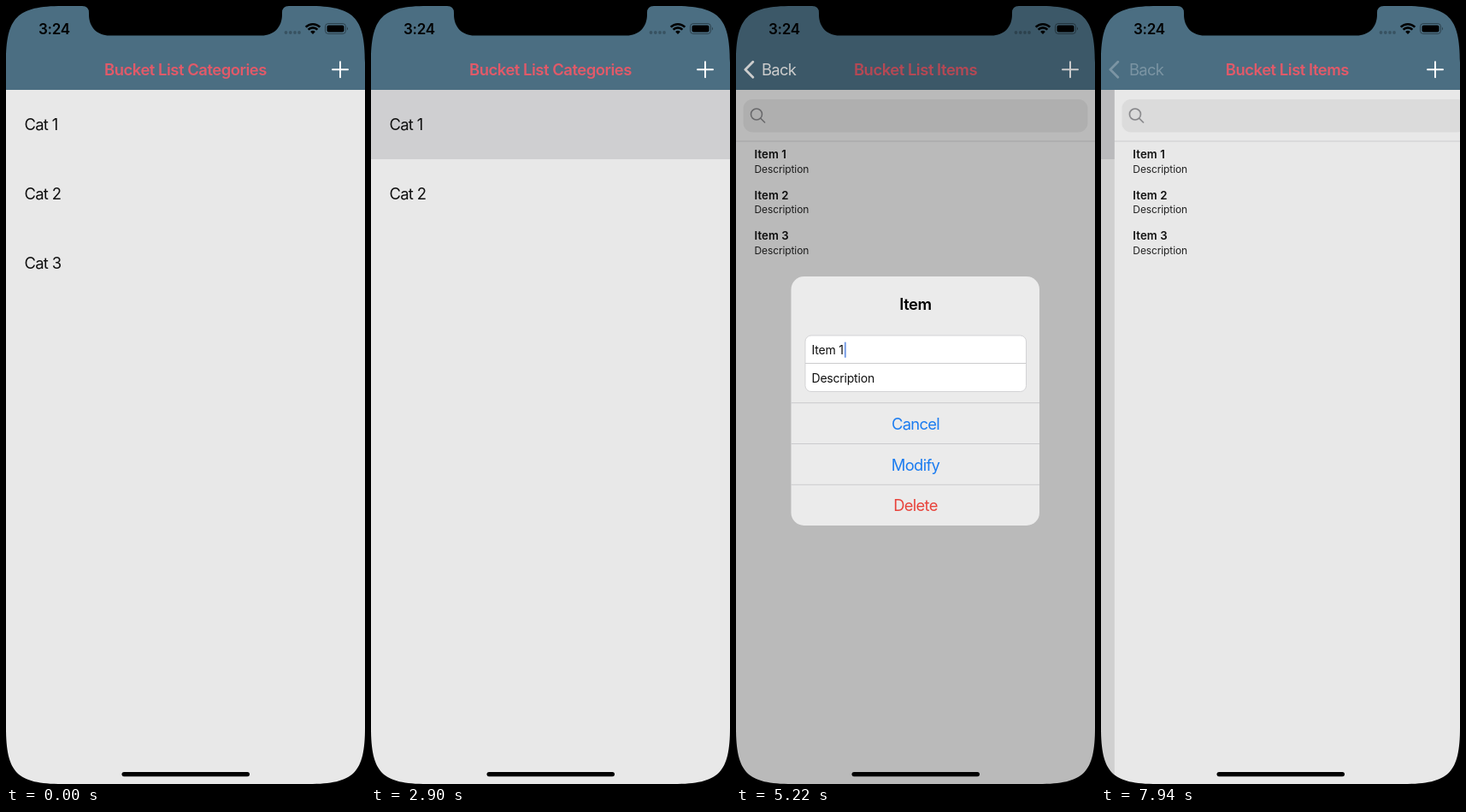
Recreate the animation shown at these times as an HTML page. Size 420 by 909 pixels, loop 8 s.

```html
<!DOCTYPE html>
<html lang="en">
<head>
<meta charset="utf-8">
<title>Bucket list app</title>
<style>
html, body { margin: 0; width: 100%; height: 100%; overflow: hidden; background: #000; }
svg { display: block; width: 420px; height: 909px; }

:root { --nav: cubic-bezier(.36, .66, .04, 1); }
text { font: 400 18.4px Inter, "Liberation Sans", sans-serif; letter-spacing: -.7px; fill: #101010; }
.title { font-weight: 600; letter-spacing: -.45px; fill: #e25a69; text-anchor: middle; }
.clock { font-weight: 600; font-size: 17px; letter-spacing: -.3px; fill: #000; }
.name { font-weight: 600; font-size: 13.2px; letter-spacing: .1px; }
.note { font-size: 12px; letter-spacing: -.1px; fill: #222; }
.field { font-size: 14px; letter-spacing: -.2px; }
.swipe { font-weight: 500; font-size: 16px; letter-spacing: 0; fill: #fff; text-anchor: middle; }
.button { fill: #1b7cf0; text-anchor: middle; }
.back { fill: #fff; }
.bg { fill: #e8e8e8; }
.mark { fill: #cfcfd1; opacity: 0; }
.rule { stroke: #cbcbcd; }

@keyframes show { to { opacity: 1; } }
@keyframes hide { to { opacity: 0; } }

/* swipe to delete */
#row { animation: drag 600ms 460ms forwards, wipe 400ms 1160ms ease-in-out forwards; }
@keyframes drag {
  from { transform: none; animation-timing-function: ease-in; }
  73.3% { transform: translateX(-63px); animation-timing-function: ease-out; }
  to { transform: translateX(-80px); }
}
@keyframes wipe { to { transform: translateX(-420px); } }
#cover { transform: scaleY(0); transform-origin: 0 341px; animation: fold 400ms 1600ms ease-in-out forwards; }
@keyframes fold { to { transform: none; } }

/* push, then the start of the pop */
#cat1 { animation: show 1ms 2890ms forwards; }
#list { animation: aside 600ms 2970ms var(--nav) forwards, home 500ms 7930ms var(--nav) forwards; }
#shade { opacity: 0; animation: shade 600ms 2970ms var(--nav) forwards; }
#page { transform: translateX(420px); animation: home 600ms 2970ms var(--nav) forwards, away 500ms 7930ms var(--nav) forwards; }
#title1 { animation: leave 600ms 2970ms var(--nav) forwards; }
#title2 { opacity: 0; transform: translateX(210px); animation: enter 600ms 2970ms var(--nav) forwards, half 500ms 7930ms var(--nav) forwards; }
#back { opacity: 0; animation: show 500ms 3050ms ease-out forwards, press 1ms 7610ms forwards; }
#label { transform: translateX(80px); animation: home 600ms 2970ms var(--nav) forwards, nudge 500ms 7930ms var(--nav) forwards; }
@keyframes aside { to { transform: translateX(-126px); } }
@keyframes home { to { transform: translateX(0); } }
@keyframes away { to { transform: translateX(420px); } }
@keyframes half { to { transform: translateX(210px); } }
@keyframes nudge { to { transform: translateX(80px); } }
@keyframes shade { to { opacity: .1; } }
@keyframes leave { to { transform: translateX(-160px); opacity: 0; } }
@keyframes enter { to { transform: none; opacity: 1; } }
@keyframes press { to { opacity: .27; } }

/* alert */
#item1 { animation: show 1ms 4410ms forwards, hide 300ms 4720ms forwards; }
#dim { opacity: 0; animation: dim 360ms 4700ms ease-out forwards, hide 340ms 5730ms ease-out forwards; }
#alert { opacity: 0; transform: scale(1.18); transform-origin: 210px 461px;
  animation: pop 420ms 4700ms var(--nav) forwards, hide 340ms 5730ms ease-out forwards; }
#tap { opacity: 0; animation: show 1ms 5450ms forwards, hide 200ms 5690ms forwards; }
#caret { animation: blink 1000ms 5120ms; }
@keyframes dim { to { opacity: .2; } }
@keyframes pop { to { opacity: 1; transform: none; } }
@keyframes blink { 10% { opacity: .7; } 24%, 50% { opacity: 0; } 68% { opacity: 1; } }
</style>
</head>
<body>
<svg viewBox="0 0 420 909">
  <defs>
    <clipPath id="rowClip"><rect y="260" width="420" height="80"/></clipPath>
    <text id="note" class="note" x="21.5" y="194.5">Description</text>
  </defs>

  <rect class="bg" width="420" height="909"/>

  <g id="list">
    <rect class="bg" y="98" width="546" height="811"/>
    <rect id="cat1" class="mark" y="98" width="546" height="81"/>
    <text x="21.5" y="145.3">Cat 1</text>
    <text x="21.5" y="226">Cat 2</text>
    <g clip-path="url(#rowClip)">
      <g id="row">
        <text x="21.5" y="306.8">Cat 3</text>
        <rect x="420" y="260" width="430" height="80" fill="#ff3b30"/>
        <g fill="#fff">
          <rect x="449" y="273" width="22" height="3" rx="1.4"/>
          <path d="M455 273.5Q455 270.5 458 270.5H462Q465 270.5 465 273.5H463Q463 272 461.500 272H458.500Q457 272 457 273.500Z"/>
          <path d="M450.500 277H469.500L468 299Q467.800 301.500 465.500 301.500H454.500Q452.200 301.500 452 299Z"/>
        </g>
        <path d="M455 280L455.700 298M460 280V298M465 280L464.300 298" stroke="#ff3b30" stroke-width="1.7" stroke-linecap="round"/>
        <text class="swipe" x="460" y="325.500">Delete</text>
      </g>
    </g>
    <rect id="cover" class="bg" y="259" width="420" height="82"/>
    <rect id="shade" y="98" width="546" height="811"/>
  </g>

  <g id="page">
    <rect class="bg" y="98" width="420" height="811"/>
    <rect x="8.500" y="109" width="403" height="38.500" rx="11" fill="#dbdbdb"/>
    <g fill="none" stroke="#838386" stroke-width="1.600" stroke-linecap="round">
      <circle cx="24" cy="126.500" r="6.500"/>
      <path d="M28.800 131.300L33.600 136"/>
    </g>
    <path class="rule" d="M0 158H420"/>
    <rect id="item1" class="mark" y="158.500" width="420" height="47.500"/>
    <text class="name" x="21.500" y="178">Item 1</text>
    <text class="name" x="21.500" y="225.500">Item 2</text>
    <text class="name" x="21.500" y="273">Item 3</text>
    <use href="#note"/>
    <use href="#note" y="47.500"/>
    <use href="#note" y="95"/>
  </g>

  <rect width="420" height="98" fill="#4b6e82"/>
  <text id="title1" class="title" x="210" y="80.800">Bucket List Categories</text>
  <text id="title2" class="title" x="210" y="80.800">Bucket List Items</text>
  <g id="back">
    <path d="M19.800 65.300L10.900 74.300L19.800 83.300" fill="none" stroke="#fff" stroke-width="2.800" stroke-linecap="round" stroke-linejoin="round"/>
    <text id="label" class="back" x="30" y="80.800">Back</text>
  </g>
  <path d="M382 74.300H400M391 65.300V83.300" stroke="#fff" stroke-width="2" stroke-linecap="round"/>

  <text class="clock" x="38" y="32.800">3:24</text>
  <g opacity=".25">
    <circle cx="327.500" cy="31" r="1.900"/><circle cx="332.800" cy="31" r="1.900"/>
    <circle cx="338" cy="31" r="1.900"/><circle cx="343" cy="31" r="1.900"/>
  </g>
  <g fill="none" stroke="#000" stroke-width="2.600">
    <path d="M350.700 24.700A11.700 11.700 0 0 1 367.300 24.700M353.600 27.600A7.600 7.600 0 0 1 364.400 27.600"/>
  </g>
  <path d="M359 33L356.100 30.100A4.100 4.100 0 0 1 361.900 30.100Z"/>
  <rect x="373.500" y="20.500" width="24" height="12" rx="3.600" fill="none" stroke="#000" stroke-opacity=".4"/>
  <path d="M399 24.500Q401 26.500 399 28.500Z" opacity=".45"/>
  <rect x="375.500" y="22.500" width="20" height="8" rx="2"/>

  <rect id="dim" width="420" height="909"/>

  <g id="alert">
    <rect x="64.500" y="316" width="290.500" height="291" rx="15" fill="#ebebeb"/>
    <path id="tap" d="M64.500 464H355V511.500H64.500Z" fill="#d9d9da"/>
    <text class="title" x="210" y="354.800" style="fill:#000">Item</text>
    <rect x="81" y="385" width="258.500" height="65.500" rx="7" fill="#fff" stroke="#cbcbcd" stroke-width=".8"/>
    <path class="rule" d="M81 417.500H339.500M64.500 463.700H355M64.500 511.500H355M64.500 559.300H355"/>
    <text class="field" x="88.500" y="406.800">Item 1</text>
    <rect id="caret" x="126.800" y="392.500" width="2" height="18.500" rx="1" fill="#3f74dc"/>
    <text class="field" x="88.500" y="439.500">Description</text>
    <text class="button" x="210" y="494.800">Cancel</text>
    <text class="button" x="210" y="542.500">Modify</text>
    <text class="button" x="210" y="590.300" style="fill:#e8433b">Delete</text>
  </g>

  <!-- device outline, notch and home bar -->
  <path fill-rule="evenodd" d="M0 0H420V909H0ZM0 66V843C0 896 13 909 66 909H354C407 909 420 896 420 843V66C420 13 407 0 354 0H66C13 0 0 13 0 66Z"/>
  <path d="M89 0Q97 0 97 8V10C97 25 107 34.500 121 34.500H299C313 34.500 323 25 323 10V8Q323 0 331 0Z"/>
  <rect x="135.500" y="895" width="149.500" height="5.200" rx="2.600"/>
</svg>
<script>
const LOOP = 8000, STEP = 80, SHIFT = 20;
const anims = document.getAnimations();
anims.forEach(a => a.pause());
const start = performance.now();

// The picture advances on an 80 ms grid.
function draw() {
  const t = (performance.now() - start) % LOOP;
  const snapped = Math.max(0, Math.floor((t - SHIFT) / STEP) * STEP + SHIFT);
  anims.forEach(a => { a.currentTime = snapped; });
  requestAnimationFrame(draw);
}
draw();
</script>
</body>
</html>
```
